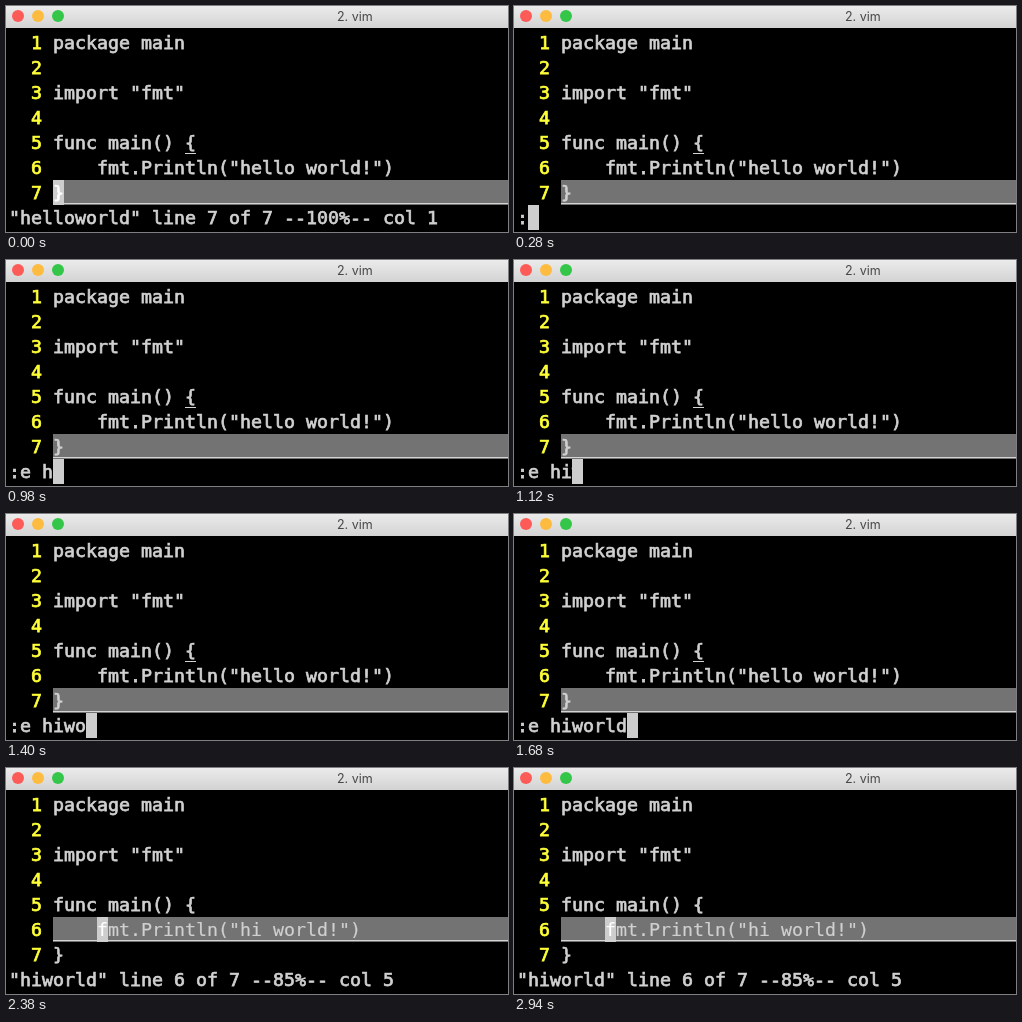
An HTML page for the animation above (3.15 s loop, 502 px wide and 226 px high).

```html
<!DOCTYPE html>
<html lang="en">
<head>
<meta charset="utf-8">
<title>2. vim</title>
<style>
  :root { --fg: #d0d0d0; --col: 11px; --row: 25px; --loop: 3150ms; }
  html, body { margin: 0; width: 100%; height: 100%; overflow: hidden; background: #000; }
  .stage { position: relative; width: 502px; height: 226px; overflow: hidden; background: #000; }

  .bar {
    position: absolute; inset: 0 0 auto; height: 22px;
    background: linear-gradient(#ebebeb, #d3d3d3);
  }
  .bar i { position: absolute; top: 4px; width: 12px; height: 12px; border-radius: 50%; }
  .close { left: 6px; background: #fc5b57; }
  .min { left: 26px; background: #fdbc40; }
  .max { left: 46px; background: #34c648; }
  .title {
    position: absolute; left: 331px; top: 0;
    font: 12.5px/21px Inter, sans-serif; color: #484848; white-space: pre;
  }

  .term {
    position: absolute; left: 3px; top: 24px; right: 0;
    font: 18.27px/25px "DejaVu Sans Mono", monospace;
    color: var(--fg); white-space: pre;
    -webkit-text-stroke: .75px currentColor;
  }
  .row { position: absolute; left: 0; right: 0; top: calc(var(--n) * var(--row)); height: var(--row); }
  .num { position: absolute; left: calc(2 * var(--col)); color: #ffff38; }
  .code { position: absolute; left: calc(4 * var(--col)); right: 0; height: var(--row); }
  .line { background: #737373; }
  .new.line { -webkit-text-stroke-width: .2px; }
  .line::after, .match::after {
    content: ""; position: absolute; left: 0; right: 0; bottom: 1px; height: 1px; background: #d4d4d4;
  }
  .match { position: absolute; left: calc(12 * var(--col)); width: var(--col); height: var(--row); }
  .block {
    position: absolute; top: 0; left: calc(var(--c) * var(--col));
    width: var(--col); height: var(--row); background: #cdcdcd; color: #fff;
  }

  .cmd { display: flex; }
  .typed { overflow: hidden; height: var(--row); }
  .caret { width: var(--col); height: var(--row); background: #cdcdcd; }

  .idle, .cmd, .old, .new, .typed { animation: var(--loop) step-end infinite; }
  .idle { animation-name: idle; }
  .cmd { animation-name: cmd; }
  .old { animation-name: old; }
  .new { animation-name: new; }
  .typed { animation-name: type; }

  @keyframes idle { 0% { visibility: visible } 6.66%, 100% { visibility: hidden } }
  @keyframes cmd { 0% { visibility: hidden } 6.66% { visibility: visible } 57.77%, 100% { visibility: hidden } }
  @keyframes old { 0% { visibility: visible } 57.77%, 100% { visibility: hidden } }
  @keyframes new { 0% { visibility: hidden } 57.77%, 100% { visibility: visible } }
  @keyframes type {
    0% { width: 11px }
    17.77% { width: 33px }
    26.66% { width: 44px }
    33.33% { width: 55px }
    39.99% { width: 66px }
    44.44% { width: 77px }
    48.88% { width: 88px }
    51.11% { width: 99px }
    53.33%, 100% { width: 110px }
  }
</style>
</head>
<body>
<div class="stage">
  <div class="bar">
    <i class="close"></i><i class="min"></i><i class="max"></i>
    <span class="title">2. vim</span>
  </div>
  <div class="term">
    <div class="row" style="--n:0"><span class="num">1</span><span class="code">package main</span></div>
    <div class="row" style="--n:1"><span class="num">2</span></div>
    <div class="row" style="--n:2"><span class="num">3</span><span class="code">import "fmt"</span></div>
    <div class="row" style="--n:3"><span class="num">4</span></div>
    <div class="row" style="--n:4"><span class="num">5</span><span class="code">func main() {<span class="match old"></span></span></div>
    <div class="row" style="--n:5"><span class="num">6</span><span class="code old">    fmt.Println("hello world!")</span><span class="code line new">    fmt.Println("hi world!")<span class="block" style="--c:4">f</span></span></div>
    <div class="row" style="--n:6"><span class="num">7</span><span class="code line old">}</span><span class="code idle"><span class="block" style="--c:0">}</span></span><span class="code new">}</span></div>
    <div class="row idle" style="--n:7">"helloworld" line 7 of 7 --100%-- col 1</div>
    <div class="row cmd" style="--n:7"><span class="typed">:e hiworld</span><span class="caret"></span></div>
    <div class="row new" style="--n:7">"hiworld" line 6 of 7 --85%-- col 5</div>
  </div>
</div>
</body>
</html>
```
